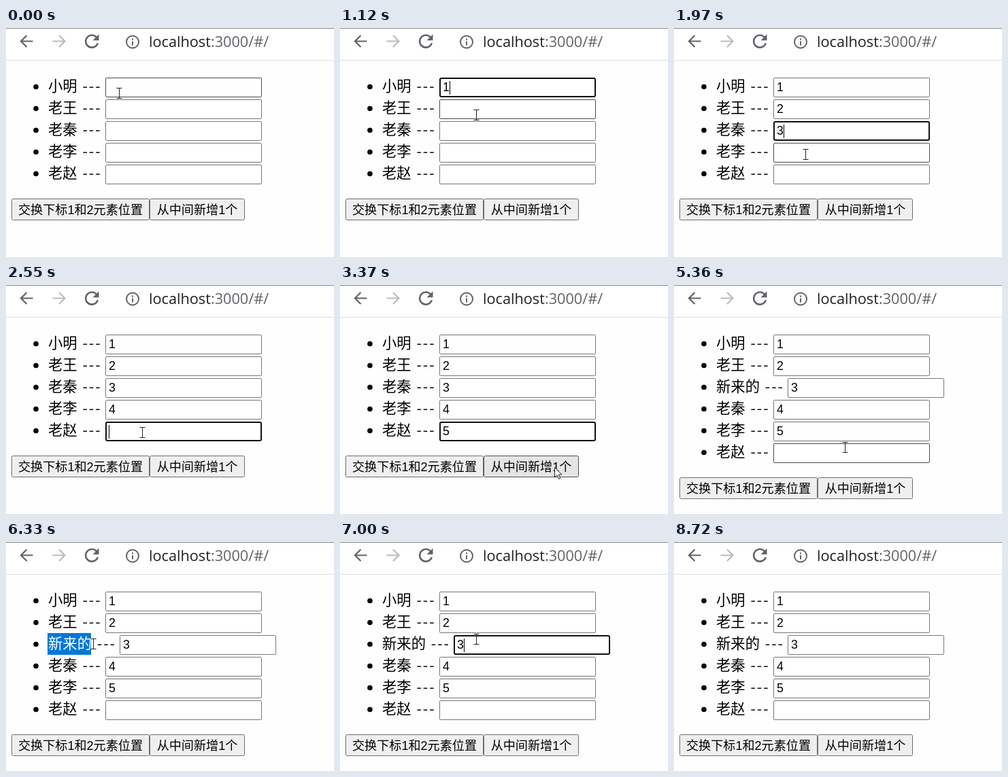
Write an HTML page that moves like this. It is 482 px wide and 337 px high and loops after 8820 ms.

```html
<!DOCTYPE html>
<html lang="zh">
<head>
<meta charset="utf-8">
<title>List keys</title>
<style>
  html, body { margin: 0; width: 100%; height: 100%; overflow: hidden; background: #fefefe; }
  svg { display: block; }
  .url { font: 21.7px "Open Sans", "Noto Sans", sans-serif; fill: #5f6368; }
  .host { fill: #202124; }
  .name { font: 21.33px "Noto Sans CJK SC", "Noto Sans CJK", sans-serif; }
  .dash { letter-spacing: 2px; }
  .field { font: 17.78px "Liberation Sans", "Noto Sans CJK SC", "Noto Sans CJK", sans-serif; }
  .label { font-size: 18.1px; }
  .box { fill: #fff; stroke: #767676; }
  .hover { stroke: #4a4a4a; }
  .focus { stroke: #101010; stroke-width: 2; }
  .btn { fill: #efefef; stroke: #6e6e6e; }
  .btn.hover { fill: #e5e5e5; stroke: #4f4f4f; }
  .btn.press { fill: #f5f5f5; stroke: #8d8d8d; }
  .icon { fill: none; stroke: #5f6368; stroke-width: 2.2; }
  .pale { stroke: #babcbe; }
  .info { stroke-width: 2; }
  .beam { fill: none; stroke: #222; }
  .arrow { fill: #fff; stroke: #222; stroke-linejoin: round; }
</style>
</head>
<body>
<svg width="482" height="337" viewBox="0 0 482 337">
  <rect width="482" height="47" fill="#fff"/>
  <rect width="482" height="1" fill="#85878a"/>
  <rect y="47" width="482" height="1" fill="#dcdee1"/>
  <path class="icon" d="M39.5 19.500H22M30.500 11L22 19.500l8.500 8.500"/>
  <path class="icon pale" d="M68.500 19.500H86.500M78 11l8.500 8.500L78 28"/>
  <path fill="#5f6368" transform="translate(110.700 4.100) scale(1.29)" d="M17.65 6.35A7.96 7.96 0 0 0 12 4a8 8 0 1 0 7.730 10h-2.080A6 6 0 1 1 12 6c1.660 0 3.140.690 4.220 1.780L13 11h7V4z"/>
  <circle class="icon info" cx="186" cy="20.500" r="9"/>
  <path class="icon info" d="M186 15.500v2.200M186 19.500v6"/>
  <text class="url" x="210" y="28"><tspan class="host">localhost</tspan>:3000/#/</text>
  <g id="page"></g>
</svg>
<script>
const LOOP = 8820;
const EM = 21.33;
const LEFT = 62;
const PEOPLE = ['小明', '老王', '老秦', '老李', '老赵'];
const ADDED = '新来的';

// Each step lists only what changes; the rest carries over.
const steps = [
  [0, { at: [166.5, 96], arrow: false, focus: -1, caret: false, typed: 0, sel: 0, added: false, press: false }],
  [150, { at: [163.5, 90] }],
  [300, { at: [161.5, 84] }],
  [580, { focus: 0, caret: true }],
  [720, { at: [162.5, 86] }],
  [850, { typed: 1 }],
  [990, { at: [182.5, 106] }],
  [1120, { at: [200.5, 128] }],
  [1280, { focus: 1 }],
  [1400, { typed: 2 }],
  [1540, { at: [197.5, 150] }],
  [1700, { focus: 2 }],
  [1840, { typed: 3 }],
  [1970, { at: [193.5, 186] }],
  [2250, { focus: 3 }],
  [2400, { typed: 4 }],
  [2550, { at: [200.5, 217], focus: 4 }],
  [2950, { typed: 5 }],
  [3090, { at: [270.5, 226] }],
  [3230, { at: [344.5, 254], arrow: true, caret: false }],
  [3370, { at: [315.5, 268.5] }],
  [3910, { focus: -1, press: true }],
  [4050, { added: true, press: false }],
  [5360, { at: [251.5, 239], arrow: false }],
  [5510, { at: [185.5, 213] }],
  [5670, { at: [102.5, 172] }],
  [5830, { at: [48.5, 152] }],
  [5990, { at: [82.5, 150], sel: 1 }],
  [6160, { at: [104.5, 150], sel: 2 }],
  [6330, { at: [128.5, 150], sel: 3 }],
  [6450, { at: [160.5, 148] }],
  [6630, { at: [192.5, 144] }],
  [6810, { at: [200.5, 143], focus: 2, sel: 0 }],
  [7000, { caret: true }],
  [7560, { at: [262.5, 146], caret: false }],
  [7680, { at: [338.5, 152] }],
  [7800, { at: [384.5, 180.5], arrow: true }],
  [7920, { at: [385.5, 209.5] }],
  [8040, { at: null }],
  [8570, { caret: true }],
  [8720, { focus: -1, caret: false }]
];

let last = {};
const states = steps.map(([time, change]) => (last = { ...last, ...change, time }));

const inside = (p, x, y, w, h) =>
  p && p[0] >= x && p[0] < x + w && p[1] >= y && p[1] < y + h;

const rect = (cls, x, y, w, h, inset, r) =>
  `<rect class="${cls}" x="${x + inset}" y="${y + inset}" width="${w - 2 * inset}" height="${h - 2 * inset}" rx="${r}"/>`;

function row(s, name, i) {
  const y = 73 + 32 * i;
  const base = y + 20;
  const end = LEFT + EM * name.length;
  const x = Math.round(end + 41.3);
  const focused = s.focus === i;
  const sel = name === ADDED ? s.sel : 0;
  const look = focused ? 'focus' : inside(s.at, x, y, 230, 29) ? 'hover' : '';
  let out = `<circle cx="44" cy="${y + 13.5}" r="3.8"/>`;
  if (sel) out += `<rect x="61" y="${y - 3}" width="${EM * sel}" height="32" fill="#0078d7"/>`;
  out += `<text class="name" x="${LEFT}" y="${base}"><tspan fill="#fff">${name.slice(0, sel)}</tspan>${name.slice(sel)}</text>`;
  out += `<text class="name dash" x="${end + 7.8}" y="${base}">---</text>`;
  out += rect(`box ${look}`, x, y, 230, 29, focused ? 1 : 0.5, focused ? 2 : 1.3);
  const filled = i < s.typed;
  if (filled) out += `<text class="field" x="${x + 5}" y="${base}">${i + 1}</text>`;
  if (focused && s.caret) out += `<rect x="${x + (filled ? 15 : 5)}" y="${y + 5}" width="1" height="20"/>`;
  return out;
}

function button(s, label, x, y, w, press) {
  const look = press ? 'press' : inside(s.at, x, y, w, 32) ? 'hover' : '';
  return rect(`btn ${look}`, x, y, w, 32, 0.5, 2) +
    `<text class="field label" x="${x + w / 2}" y="${y + 23}" text-anchor="middle">${label}</text>`;
}

function pointer(s) {
  if (!s.at) return '';
  const [cls, d] = s.arrow
    ? ['arrow', 'M0 0v14.5l3.4-3.2 2.5 5.7 2.3-1-2.5-5.5h4.6z']
    : ['beam', 'M-4-7.5h8M0-7.5v15M-4 7.5h8'];
  return `<path class="${cls}" transform="translate(${s.at})" d="${d}"/>`;
}

function draw(s) {
  const names = s.added ? [...PEOPLE.slice(0, 2), ADDED, ...PEOPLE.slice(2)] : PEOPLE;
  const y = 91 + 32 * names.length;
  return names.map((name, i) => row(s, name, i)).join('') +
    button(s, '交换下标1和2元素位置', 8, y, 203, false) +
    button(s, '从中间新增1个', 211, y, 140, s.press) +
    pointer(s);
}

const page = document.getElementById('page');
const start = performance.now();
let shown = null;

function tick() {
  const t = (performance.now() - start) % LOOP;
  const s = states.findLast(state => state.time <= t);
  if (s !== shown) {
    page.innerHTML = draw(s);
    shown = s;
  }
  requestAnimationFrame(tick);
}
tick();
</script>
</body>
</html>
```
